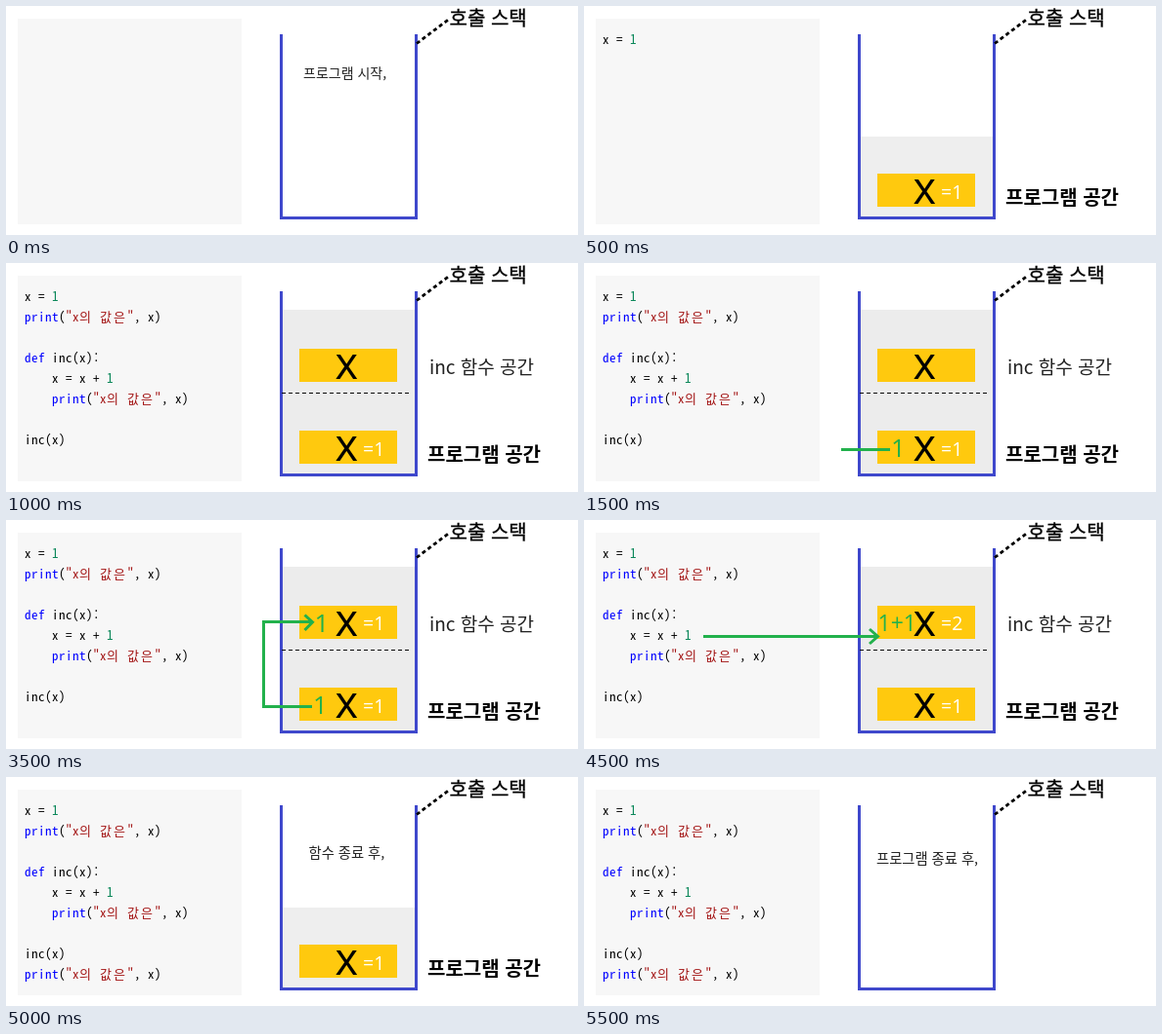
These frames come from a looping animation (585x235 px, 6.3 s). An HTML page:

```html
<!DOCTYPE html>
<html lang="ko">
<head>
<meta charset="utf-8">
<style>
html, body { margin: 0; width: 100%; height: 100%; overflow: hidden; background: #fff; }
svg { display: block; }
text { font-family: "Noto Sans CJK KR", "Noto Sans CJK", "Noto Sans CJK JP", sans-serif; white-space: pre; }
.code text { font: 13px "Noto Sans Mono CJK KR", "Noto Sans Mono CJK JP", "Noto Sans CJK KR", monospace; }
.label { font-size: 20px; }
.mid { stroke: #000; stroke-width: .3; }
.bold { font-weight: 700; }
.note { font-size: 14.3px; fill: #222; }
.var { font: 45px "Open Sans", sans-serif; }
.val { font: 19.5px "Open Sans", sans-serif; fill: #fff; }
.num { font: 26px "Open Sans", sans-serif; fill: #22b14c; }
.arrow { fill: none; stroke: #22b14c; stroke-width: 3; }
.kw { fill: #00f; }
.str { fill: #a31515; }
.lit { fill: #098658; }
</style>
</head>
<body>
<svg width="585" height="235" viewBox="0 0 585 235">
  <rect x="12" y="13" width="229" height="211" fill="#f7f7f7"/>
  <g class="code" id="code"></g>

  <rect data-on="1 1 10 10" x="283" y="134" width="135" height="82" fill="#eee"/>
  <rect data-on="2 9" x="283" y="48" width="135" height="168" fill="#ececec"/>
  <path d="M281.5 29V217.5H419.5V29" fill="none" stroke="#3f48cc" stroke-width="3"/>
  <path d="M420 38.5L453 13.5" stroke="#000" stroke-width="2.8" stroke-dasharray="4 3.2"/>
  <text class="label mid" x="453.5" y="19.5">호출 스택</text>

  <g data-on="1 10">
    <rect x="300" y="172" width="100" height="34" fill="#ffc90e"/>
    <text class="var" x="336.5" y="203">x</text>
    <text class="val" x="365" y="198.3">=1</text>
    <text class="label bold" x="431" y="203.5">프로그램 공간</text>
  </g>

  <g data-on="2 9">
    <rect x="300" y="88" width="100" height="34" fill="#ffc90e"/>
    <text class="var" x="336.5" y="119">x</text>
    <path d="M282 133.5H415" stroke="#000" stroke-dasharray="4 3"/>
    <text class="label" style="font-size:19px" fill="#222" x="433" y="113.5">inc 함수 공간</text>
  </g>
  <text class="val" data-on="7 8" x="365" y="113">=1</text>
  <text class="val" data-on="9 9" x="365" y="113">=2</text>

  <g data-on="3 7">
    <text class="num" x="314" y="199">1</text>
    <path class="arrow" d="M263 191.5H313"/>
  </g>
  <path class="arrow" data-on="4 7" d="M263.5 193V103"/>
  <path class="arrow" data-on="5 7" d="M265 104.5H314M305.5 97.5L313.5 104.8L305.5 113"/>
  <text class="num" data-on="6 7" x="315.5" y="114.5">1</text>

  <g data-on="8 9">
    <path class="arrow" d="M122 119.5H300M292 112L300.5 119.5L292 127"/>
    <text class="num" style="font-size:23px" x="300.5" y="114">1+1</text>
  </g>

  <text class="note" style="font-size:14px" data-on="0 0" x="304" y="74">프로그램 시작,</text>
  <text class="note" data-on="10 10" x="309.5" y="82.5">함수 종료 후,</text>
  <text class="note" data-on="11 11" x="299" y="89">프로그램 종료 후,</text>
</svg>
<script>
const LOOP = 6300, STEP = 500, LAST = 11, CELL = 7;
const PRINT = 'print("x의 값은", x)';
// [row, first step, text]
const lines = [
  [0, 1, 'x = 1'], [1, 2, PRINT], [3, 2, 'def inc(x):'], [4, 2, '    x = x + 1'],
  [5, 2, '    ' + PRINT], [7, 2, 'inc(x)'], [8, 10, PRINT]
];
const kind = s => /^(print|def)$/.test(s) ? 'kw' : s[0] === '"' ? 'str' : /^\d/.test(s) ? 'lit' : '';

// Terminal grid: a Hangul syllable fills two cells.
document.getElementById('code').innerHTML = lines.map(([row, from, src]) => {
  let x = 19;
  const place = c => {
    const at = x;
    x += c >= '가' ? 2 * CELL : CELL;
    return at;
  };
  const spans = src.match(/print|def|"[^"]*"|\d+|\s+|[^\s"\d]+/g).map(s =>
    `<tspan x="${[...s].map(place).join(' ')}" class="${kind(s)}">${s}</tspan>`);
  return `<text y="${38.5 + row * 21}" data-on="${from} ${LAST}">${spans.join('')}</text>`;
}).join('');

const parts = [...document.querySelectorAll('[data-on]')].map(el => [el, el.dataset.on.split(' ').map(Number)]);

function draw(now) {
  const step = Math.min(LAST, Math.floor(now % LOOP / STEP));
  for (const [el, spans] of parts) {
    const on = spans.some((from, i) => i % 2 === 0 && step >= from && step <= spans[i + 1]);
    el.style.display = on ? '' : 'none';
  }
}

const start = performance.now();
function tick() {
  draw(performance.now() - start);
  requestAnimationFrame(tick);
}
tick();
</script>
</body>
</html>
```
